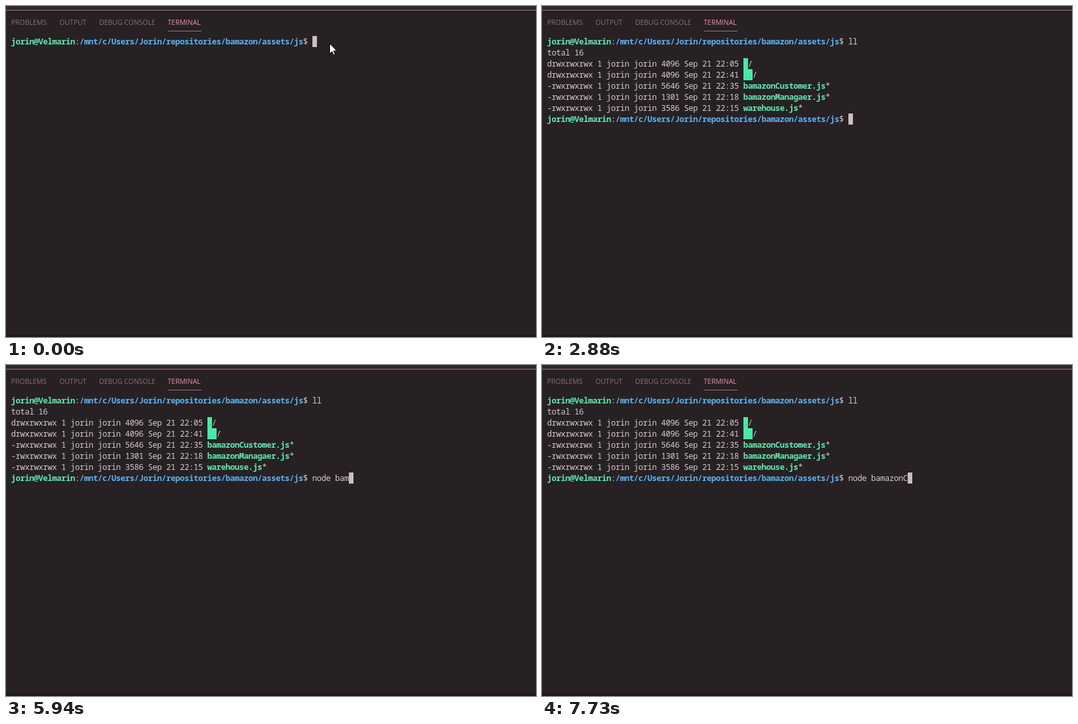
Write an HTML page that moves like this. It is 813x508 px and loops after 8 s.

```html
<!DOCTYPE html>
<html lang="en">
<head>
<meta charset="utf-8">
<title>Terminal</title>
<style>
  html, body { margin: 0; width: 100%; height: 100%; overflow: hidden; background: #272123; }
  svg { display: block; width: 100%; height: 100%; }
  text { white-space: pre; }
  .mono { font: 500 12.4px "Noto Sans Mono", monospace; fill: #d6cace; text-anchor: middle; }
  .tab { font: 10.5px "Open Sans", sans-serif; fill: #8d6c79; }
  .tab.on { fill: #f18eb0; }
  .green { fill: #60ebb1; font-weight: 700; }
  .blue { fill: #5bb3f5; font-weight: 700; }
  .dir { fill: #49ace9; }
</style>
</head>
<body>
<svg id="stage" viewBox="0 0 813 508"></svg>
<script>
const LOOP = 8000, LEFT = 8, TOP = 46, CW = 7, CH = 17, PROMPT_ROW = 7;
const stage = document.getElementById('stage');

function add(parent, tag, attrs, content) {
  const el = document.createElementNS('http://www.w3.org/2000/svg', tag);
  for (const key in attrs) el.setAttribute(key, attrs[key]);
  if (content) el.textContent = content;
  return parent.appendChild(el);
}
const rect = (parent, x, y, width, height, fill) =>
  add(parent, 'rect', { x, y, width, height, fill });
const cellX = col => LEFT + col * CW;
const cellY = row => TOP + row * CH;

// Each character is centred in its own cell, as a terminal does.
function setCells(el, col, str) {
  el.setAttribute('x', Array.from(str, (_, i) => cellX(col + i + 0.5)).join(' '));
  el.textContent = str;
}
const monoText = (parent, row, style = '') =>
  add(parent, 'text', { y: cellY(row) + 13, class: 'mono ' + style });

// Writes styled runs on the character grid and returns the next free column.
function write(parent, row, runs) {
  let col = 0;
  for (const [str, style] of runs) {
    if (style === 'dir') rect(parent, cellX(col), cellY(row), str.length * CW, CH, '#49e9a6');
    setCells(monoText(parent, row, style), col, str);
    col += str.length;
  }
  return col;
}

// Panel chrome
rect(stage, 0, 0, 813, 508, '#272123');
rect(stage, 0, 0, 813, 6, '#32292d');
rect(stage, 0, 6, 813, 1, '#997582');
rect(stage, 0, 504, 813, 4, '#1f191b');
[['PROBLEMS', 8], ['OUTPUT', 82], ['DEBUG CONSOLE', 143], ['TERMINAL', 248]].forEach(([name, x], i) =>
  add(stage, 'text', { x, y: 29, class: i === 3 ? 'tab on' : 'tab' }, name));
rect(stage, 248, 38, 52, 1, '#997582');

// Terminal contents
const prompt = [
  ['jorin@Velmarin', 'green'], [':'],
  ['/mnt/c/Users/Jorin/repositories/bamazon/assets/js', 'blue'], ['$ ']
];
const entry = (mode, size, time) => [`${mode} 1 jorin jorin ${size} Sep 21 ${time} `];
const DIR = 'drwxrwxrwx', FILE = '-rwxrwxrwx';

const inputCol = write(stage, 0, prompt);
const output = add(stage, 'g', {});
[
  [['total 16']],
  [entry(DIR, 4096, '22:05'), ['.', 'dir'], ['/']],
  [entry(DIR, 4096, '22:41'), ['..', 'dir'], ['/']],
  [entry(FILE, 5646, '22:35'), ['bamazonCustomer.js', 'green'], ['*']],
  [entry(FILE, 1301, '22:18'), ['bamazonManagaer.js', 'green'], ['*']],
  [entry(FILE, 3586, '22:15'), ['warehouse.js', 'green'], ['*']],
  prompt
].forEach((runs, i) => write(output, i + 1, runs));

const listInput = monoText(stage, 0), nodeInput = monoText(stage, PROMPT_ROW);
const caret = rect(stage, 0, 0, CW, CH, '#cbbec2');
const pointer = add(stage, 'path', {
  d: 'M.5 .5V16.5L4.2 13L6.7 18.5L9 17.5L6.6 12H11.5Z',
  fill: '#fff', stroke: '#000', 'stroke-width': 1
});

// Timelines: [start ms, value]
const ENTER = 2880;
const listKeys = [[0, ''], [2480, 'l'], [2610, 'll']];
const nodeKeys = [
  [0, ''], [4430, 'n'], [4710, 'no'], [4990, 'nod'], [5120, 'node'], [5240, 'node '],
  [5670, 'node b'], [5820, 'node ba'], [5940, 'node bam'], [6060, 'node bama'],
  [6220, 'node bamazo'], [6370, 'node bamazon '], [6780, 'node bamazon C'],
  [7340, 'node bamazon '], [7460, 'node bamazon'], [7730, 'node bamazonC']
];
const pointerKeys = [[0, [496, 57]], [270, [498, 57]], [960, [606, 62]], [1110, null]];

function valueAt(keys, t) {
  let value;
  for (const [start, v] of keys) if (t >= start) value = v;
  return value;
}

function draw(t) {
  const listed = t >= ENTER;
  const first = valueAt(listKeys, t), second = valueAt(nodeKeys, t);
  setCells(listInput, inputCol, first);
  setCells(nodeInput, inputCol, second);
  output.setAttribute('visibility', listed ? 'visible' : 'hidden');
  caret.setAttribute('x', cellX(inputCol + (listed ? second : first).length));
  caret.setAttribute('y', cellY(listed ? PROMPT_ROW : 0));

  const spot = valueAt(pointerKeys, t);
  pointer.setAttribute('visibility', spot ? 'visible' : 'hidden');
  if (spot) pointer.setAttribute('transform', `translate(${spot})`);
}

const begin = performance.now();
function tick() {
  draw((performance.now() - begin) % LOOP);
  requestAnimationFrame(tick);
}
draw(0);
requestAnimationFrame(tick);
</script>
</body>
</html>
```
